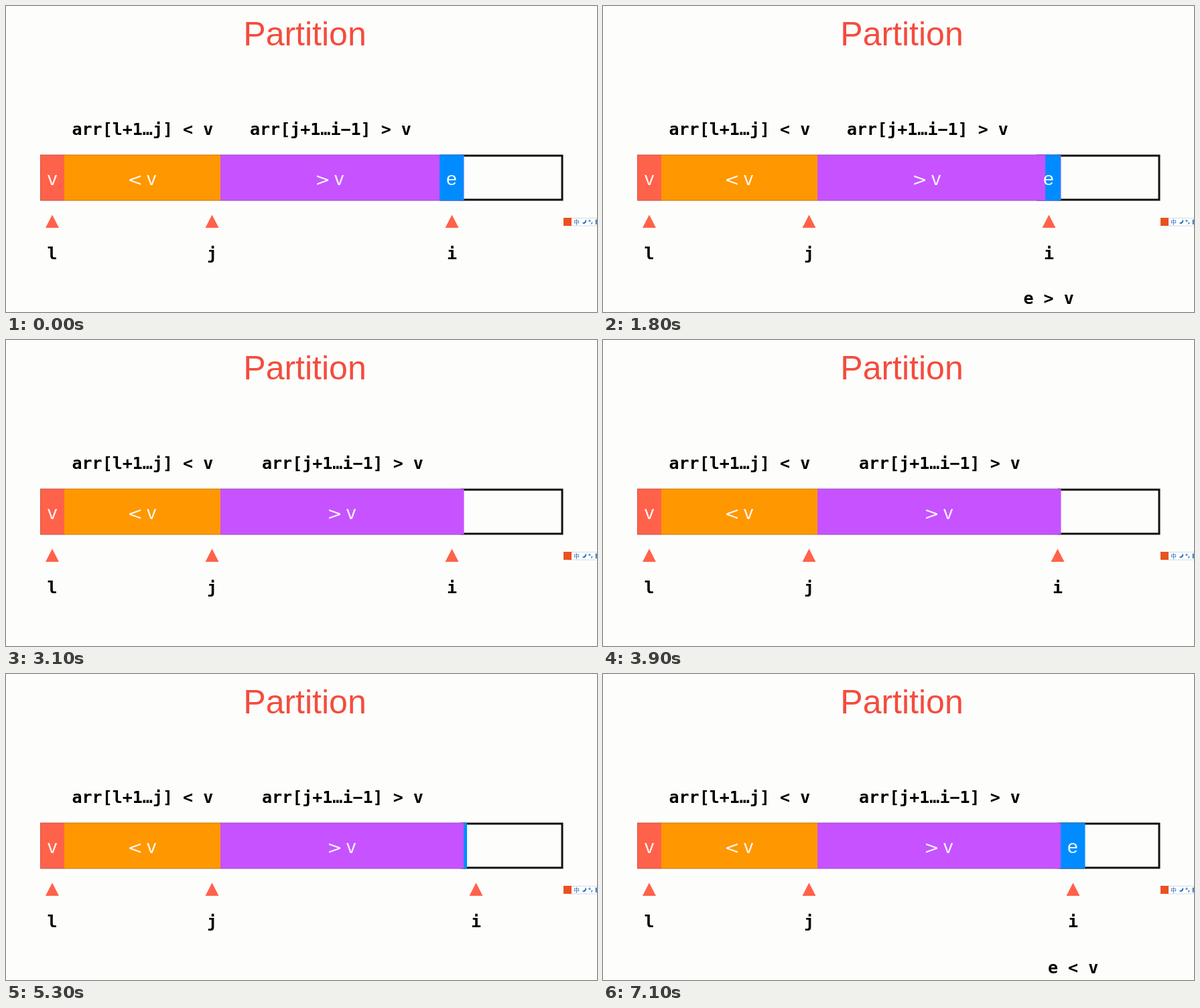
Animation of 882x458 px, one loop 8000 ms. Source, as an HTML page:

```html
<!DOCTYPE html>
<html lang="en">
<head>
<meta charset="utf-8">
<title>Partition</title>
<style>
html, body { margin: 0; width: 100%; height: 100%; overflow: hidden; background: #fdfdfc; }
svg { display: block; width: 882px; height: 458px; }
text { white-space: pre; }
.title { font: 50px "Liberation Sans", Arial, sans-serif; fill: #f44c3d; }
.code { font: bold 25px "DejaVu Sans Mono", Menlo, monospace; fill: #000; }
.cell { font: 28.5px "Liberation Sans", Arial, sans-serif; fill: #fff; fill-opacity: .93; text-anchor: middle; }
.cmp { font: 27px "DejaVu Sans", sans-serif; }
.mid { text-anchor: middle; }
.ime { font: 9px "Noto Sans CJK SC", "Noto Sans CJK", sans-serif; fill: #1f66b5; }
.red { fill: #ff624a; }
.orange { fill: #ff9700; }
.purple { fill: #c653ff; }
.blue { fill: #008cff; }
.edge { fill: none; stroke: #5a4a50; stroke-opacity: .35; }

.old, .new, .greater, .less, .ptr, .cover, .reveal { animation: 8s infinite both; }
.old { animation-name: leave; }
.new { animation-name: enter; }
.greater { animation-name: greater; }
.less { animation-name: less; }
.ptr { animation-name: advance; animation-timing-function: step-end; }
.cover { animation-name: cover; animation-timing-function: step-end; }
.reveal { animation-name: reveal; animation-timing-function: step-end; }

@keyframes leave {
  0% { opacity: 1; }
  35% { opacity: 1; animation-timing-function: steps(2, start); }
  37.5%, 100% { opacity: 0; }
}
@keyframes enter {
  0% { opacity: 0; }
  35% { opacity: 0; animation-timing-function: steps(2, start); }
  37.5%, 100% { opacity: 1; }
}
@keyframes greater {
  0% { opacity: 0; }
  5% { opacity: 0; animation-timing-function: steps(3, start); }
  8.75% { opacity: 1; }
  35% { opacity: 1; animation-timing-function: steps(2, start); }
  37.5%, 100% { opacity: 0; }
}
@keyframes less {
  0% { opacity: 0; }
  80% { opacity: 0; animation-timing-function: steps(3, start); }
  83.75%, 100% { opacity: 1; }
}
@keyframes cover {
  0% { width: 0; }
  22.5% { width: 13px; }
  23.75% { width: 22px; }
  25% { width: 31px; }
  26.25%, 100% { width: 36px; }
}
@keyframes reveal {
  0% { width: 0; }
  66.25% { width: 5px; }
  67.5% { width: 14px; }
  68.75% { width: 23px; }
  70% { width: 32px; }
  71.25%, 100% { width: 37px; }
}
/* ease-in-out at ten pictures per second */
@keyframes advance {
  0% { transform: translateX(0); }
  46.25% { transform: translateX(1.5px); }
  47.5% { transform: translateX(5.9px); }
  48.75% { transform: translateX(13px); }
  50% { transform: translateX(22.8px); }
  51.25% { transform: translateX(30.1px); }
  52.5% { transform: translateX(34.5px); }
  53.75%, 100% { transform: translateX(36px); }
}
</style>
</head>
<body>
<svg viewBox="0 0 882 458">
  <defs>
    <path id="tri" class="red" d="M0 312.5L10 332H-10Z"/>
    <clipPath id="wipe"><rect class="reveal" x="683" y="222" width="0" height="70"/></clipPath>
  </defs>

  <text class="title mid" x="446" y="59">Partition</text>
  <text class="code" x="98.5" y="193">arr[l+1…j] &lt; v</text>

  <rect x="680" y="224" width="150" height="66" fill="#fdfdfc" stroke="#111" stroke-width="3"/>
  <rect class="red" x="51" y="222.5" width="36.5" height="69"/>
  <rect class="orange" x="87" y="222.5" width="233.5" height="69"/>
  <rect class="purple" x="320" y="222.5" width="363.5" height="69"/>
  <path class="edge" d="M683.5 223H51.5V291H683.5"/>
  <text class="cell" x="69" y="268">v</text>
  <text class="cell cmp" x="192.5" y="269">&lt;</text>
  <text class="cell" x="217" y="268">v</text>

  <g class="old">
    <text class="code" x="364" y="193">arr[j+1…i−1] &gt; v</text>
    <text class="cell cmp" x="472.5" y="269">&gt;</text>
    <text class="cell" x="497" y="268">v</text>
    <rect class="blue" x="647" y="222.5" width="36" height="69"/>
    <rect class="purple cover" x="647" y="222.5" width="0" height="69"/>
    <path class="edge" d="M647 223H683M647 291H683"/>
    <text class="cell" x="665" y="268">e</text>
  </g>

  <g class="new">
    <text class="code" x="382" y="193">arr[j+1…i−1] &gt; v</text>
    <text class="cell cmp" x="490.5" y="269">&gt;</text>
    <text class="cell" x="515" y="268">v</text>
  </g>

  <g clip-path="url(#wipe)">
    <rect class="blue" x="683" y="222.5" width="36.5" height="69"/>
    <path class="edge" d="M683 223H719.5M683 291H719.5"/>
    <text class="cell" x="701" y="268">e</text>
  </g>

  <use href="#tri" x="69"/>
  <text class="code mid" x="69" y="379">l</text>
  <use href="#tri" x="307.5"/>
  <text class="code mid" x="307.5" y="379">j</text>
  <g class="ptr">
    <use href="#tri" x="665.5"/>
    <text class="code mid" x="665.5" y="379">i</text>
  </g>

  <text class="code greater" x="627.5" y="446">e &gt; v</text>
  <text class="code less" x="664" y="448">e &lt; v</text>

  <rect x="838.5" y="317.5" width="50" height="11.5" fill="#fff" stroke="#cfdcea"/>
  <rect x="832" y="317" width="12" height="12" fill="#e9521f"/>
  <text class="ime" x="847" y="326.5">中</text>
  <path d="M865 319.5A3.6 3.6 0 1 1 859.5 324.5A5 5 0 0 0 865 319.5Z" fill="#1f66b5"/>
  <circle cx="871" cy="321.5" r="1.2" fill="none" stroke="#1f66b5"/>
  <path d="M874.5 323.5v1.5l-1 1.5M884 320.5h-3.5v5.5h3.5M880.5 323h3.5" fill="none" stroke="#1f66b5" stroke-width="1.3"/>
</svg>
</body>
</html>
```
